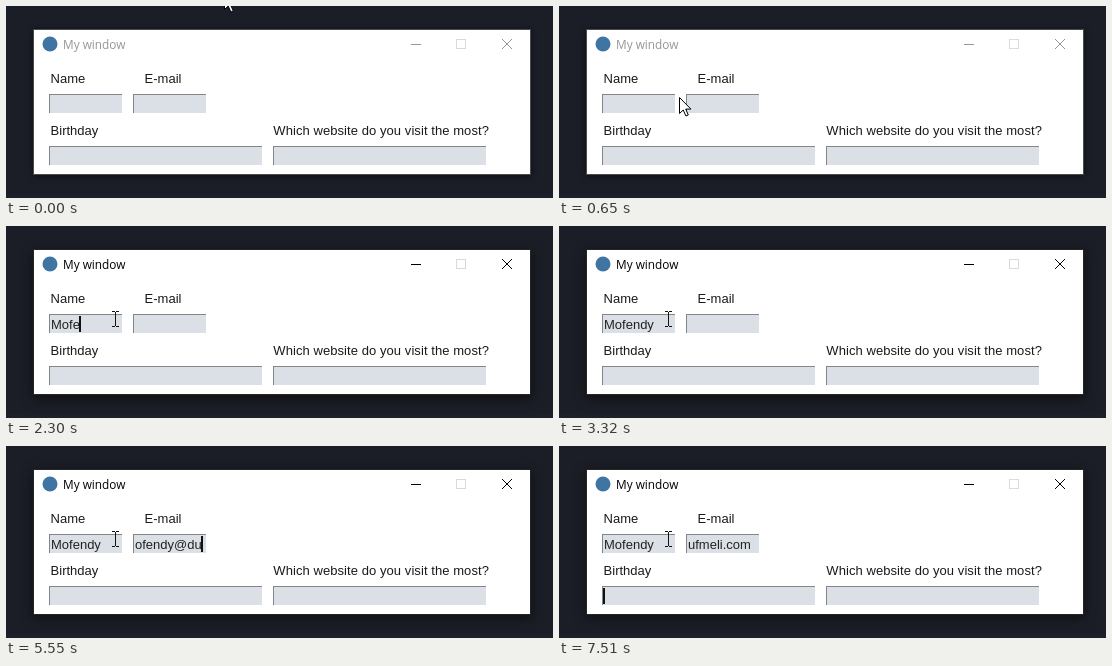
An HTML page for the animation above (8000 ms loop, 547 by 192 pixels).

```html
<!DOCTYPE html>
<html lang="en">
<head>
<meta charset="utf-8">
<title>My window</title>
<style>
  html, body { margin: 0; width: 100%; height: 100%; overflow: hidden; background: #1b1e26; }
  svg { display: block; }
  text { font: 13px "Liberation Sans", Arial, sans-serif; fill: #1a1a1b; white-space: pre; }
  .title { font: 11.8px "Open Sans", "Noto Sans", sans-serif; fill: currentColor; }
  .entry text { fill: #222; }
</style>
</head>
<body>
<svg id="stage" width="547" height="192" viewBox="0 0 547 192">
  <rect width="547" height="192" fill="#1b1e26"/>
  <rect y="188" width="547" height="4" fill="#1c202b"/>
  <rect id="frame" x="27" y="23" width="498" height="146"/>
  <rect x="28" y="24" width="496" height="144" fill="#fff"/>
  <g id="bar" fill="none" stroke="currentColor">
    <circle cx="44" cy="38" r="7.5" fill="#3f74a3" stroke="none"/>
    <text class="title" x="57" y="43" stroke="none">My window</text>
    <path d="M405 38.5h10M496 33l10 10m0-10l-10 10"/>
    <rect x="450.5" y="33.5" width="9" height="9" stroke="#dadada"/>
  </g>
  <text x="44.6" y="77">Name</text>
  <text x="138.6" y="77">E-mail</text>
  <text x="44.6" y="129">Birthday</text>
  <text x="267.3" y="129" letter-spacing=".07">Which website do you visit the most?</text>
  <g id="entries"></g>
  <path id="arrow" d="M.5 .5v16l3.7-3.5 2.7 6 2.4-1-2.6-5.9h5.2z" fill="#fff" stroke="#000"/>
  <path id="beam" d="M-3 -7.5h3m1 0h3M.5 -7v14M-3 7.5h3m1 0h3" fill="none" stroke="#111"/>
</svg>
<script>
const LOOP = 8000;
const VIEW = 69;                 // text width that fits in a narrow entry
const BLINK = 890, LIT = 590;    // caret period and its visible part

// Each entry gains focus at a time and receives bursts of evenly spaced keys.
const fields = [
  { x: 43, y: 88, w: 74, focus: 950, blur: 3510,
    bursts: [{ keys: 'Mofendy', at: 1930, gap: 105 }] },
  { x: 127, y: 88, w: 74, focus: 3510, blur: 7510,
    bursts: [
      { keys: 'mofendy', at: 3980, gap: 113 },
      { keys: '@dufmeli', at: 5100, gap: 205 },
      { keys: '.com', at: 6720, gap: 113 }
    ] },
  { x: 43, y: 140, w: 214, focus: 7510, blur: LOOP, bursts: [] },
  { x: 267, y: 140, w: 214, focus: LOOP, blur: LOOP, bursts: [] }
];

const $ = id => document.getElementById(id);
const clamp = v => Math.max(0, Math.min(1, v));
const mix = (a, b, p) => a + (b - a) * p;
const grey = (a, b, p) => `rgb(${Array(3).fill(Math.round(mix(a, b, p)))})`;

const pen = document.createElement('canvas').getContext('2d');
pen.font = '13px "Liberation Sans", Arial, sans-serif';
const width = s => pen.measureText(s).width;

$('entries').innerHTML = fields.map(({ x, y, w }) => `
  <svg class="entry" x="${x}" y="${y}" width="${w - 1}" height="19">
    <rect width="100%" height="100%" fill="#dae0e6"/>
    <path d="M0 .5h${w}M.5 0v20" stroke="#838689"/>
    <text x="2" y="15"></text>
    <rect class="caret" y="2" width="2" height="16" fill="#111"/>
  </svg>`).join('');
document.querySelectorAll('.entry').forEach((e, i) => {
  fields[i].text = e.querySelector('text');
  fields[i].caret = e.querySelector('.caret');
});

const typed = (bursts, t) => bursts.map(({ keys, at, gap }) =>
  keys.slice(0, Math.max(0, Math.floor((t - at) / gap) + 1))).join('');

// Scroll only when a new character starts outside the entry.
function scrolled(value) {
  let view = '';
  for (const c of value) {
    const outside = width(view) >= VIEW;
    view += c;
    while (outside && width(view) > VIEW) view = view.slice(1);
  }
  return view;
}

function drawEntry({ text, caret, focus, blur, bursts }, t) {
  const view = scrolled(typed(bursts, t));
  const lit = t >= focus && t < blur && (t - focus) % BLINK < LIT;
  text.textContent = view;
  caret.setAttribute('x', Math.round(width(view)) + 1);
  caret.setAttribute('visibility', lit ? 'visible' : 'hidden');
}

function drawPointer(t) {
  const p = 1 - (1 - clamp(t / 650)) ** 2;
  const q = clamp((t - 750) / 100);
  const x = Math.round(mix(mix(218, 120, p), 109, q));
  const y = Math.round(mix(mix(-13, 91, p), 93, q));
  const inEntry = x < 117;
  for (const id of ['arrow', 'beam']) {
    $(id).setAttribute('transform', `translate(${x} ${y})`);
    $(id).setAttribute('visibility', (id === 'beam') === inEntry ? 'visible' : 'hidden');
  }
}

function draw(t) {
  const active = clamp((t - 830) / 220);
  $('bar').style.color = grey(150, 0, active);
  $('frame').style.fill = grey(76, 38, active);
  $('frame').style.filter =
    `drop-shadow(0 ${mix(1, 3, active)}px ${mix(3, 6, active)}px rgba(0,0,0,.55))`;
  fields.forEach(f => drawEntry(f, t));
  drawPointer(t);
}

const start = performance.now();
function tick() {
  draw((performance.now() - start) % LOOP);
  requestAnimationFrame(tick);
}
tick();
</script>
</body>
</html>
```
